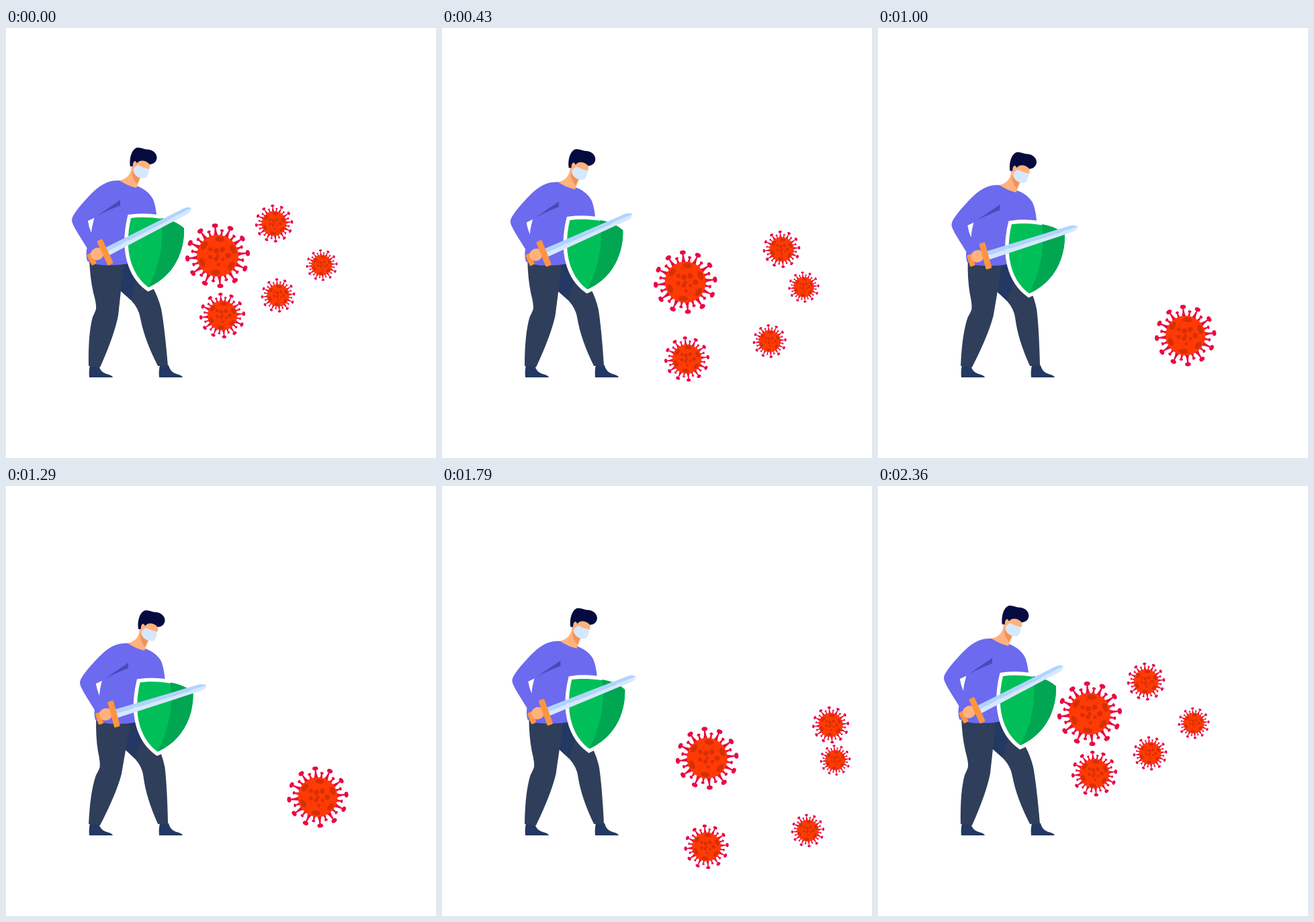
Write an HTML page that moves like this. It is 640x640 px and loops after 2430 ms.

```html
<!DOCTYPE html>
<html lang="en">
<head>
<meta charset="utf-8">
<title>Shield against viruses</title>
<style>
html, body { margin: 0; width: 100%; height: 100%; overflow: hidden; background: #fff; }
svg { display: block; width: 100%; height: 100%; }
</style>
</head>
<body>
<svg viewBox="0 0 640 640">
  <defs>
    <g id="virus"></g>
    <clipPath id="floor"><path d="M0 0H640V570H0Z"/></clipPath>
  </defs>

  <g fill="#233862">
    <path id="shoe" d="M125 502Q123 511 124 520H159Q158 517 150 515Q140 512 138 502Z"/>
    <use href="#shoe" x="104"/>
  </g>

  <g id="legs" fill="#2f3e5b">
    <path d="M182 345L171 391L186 405Q198 418 200 432Q206 464 226 503H241Q236 445 231 418Q227 402 219 387L205 345Z"/>
    <path fill="#233862" d="M170 345V391L186 405Q190 385 198 368L194 345Z"/>
    <path d="M124 344Q125 372 130 394Q135 412 134 418Q133 422 129 430Q122 456 123 503L140 505Q161 458 167 428L176 345Z"/>
  </g>

  <path id="body" fill="#6c6aef" d="M168 227L194 235C205 238 217 248 220 258Q224 270 225 290L200 345Q180 353 158 353Q132 354 121 347Q118 337 121 325L132 280L150 240Z"/>

  <g id="top">
    <path fill="#6c6aef" d="M176 228C150 223 135 238 120 254C106 269 98 280 98 286C98 293 112 313 121 328L127 304L122 288L150 272Z"/>
    <path fill="#fff" d="M122 287L131 283Q128 292 127 305Q123 296 122 287Z"/>
    <path fill="#434db8" d="M135 280L170 256V264Q150 272 135 280Z"/>
    <path fill="#ffb27d" d="M187 201Q188 223 169 227Q181 235 194 238L201 221L214 209V200L200 194Z"/>
    <path fill="#f0935a" d="M188 212Q190 219 199 223L195 232Q187 224 188 212Z"/>
    <path fill="#050b3f" d="M185 206C183 195 187 179 196 178C203 178 205 181 213 181C222 183 226 190 224 196Q222 202 214 203Q207 196 199 198L188 206Z"/>
    <path fill="#ffb27d" d="M189 208Q188 199 192 198Q195 199 195 204L192 209Z"/>
    <path fill="#d5e8ff" d="M196 204Q204 208 213 210Q212 220 208 223Q199 225 193 219Q189 214 190 209Z"/>
  </g>

  <g id="shield">
    <path fill="#00bf58" stroke="#fff" stroke-width="11" paint-order="stroke" d="M186 283C207 280 246 282 265 298C266 333 250 369 212 386C186 367 175 330 186 283Z"/>
    <path fill="#00a651" d="M231 283Q252 286 265 298C266 333 250 369 212 386Q238 335 231 283Z"/>
  </g>

  <g id="sword">
    <g transform="rotate(-27)">
      <path fill="#b0d4ff" d="M0 -6L135 -5Q142 -4 145 0H0Z"/>
      <path fill="#d5e8ff" d="M0 0H145Q141 5 135 5L0 7Z"/>
      <g fill="#ff9540">
        <rect x="-26" y="-9" width="8" height="18" rx="2"/>
        <ellipse fill="#ffb27d" cx="-11" cy="-3" rx="10" ry="9"/>
        <rect x="-4" y="-20" width="9" height="40" rx="2" transform="rotate(2)"/>
      </g>
    </g>
  </g>

  <g id="swarm" clip-path="url(#floor)"></g>
</svg>
<script>
const $ = id => document.getElementById(id);
const place = (el, transform) => el.setAttribute('transform', transform);

const oval = (angle, r, rx, ry) =>
  `<ellipse cx="${r}" rx="${rx}" ry="${ry}" transform="rotate(${angle})"/>`;
const spike = (angle, r, size) => oval(angle, r, size * .7, size) +
  `<path d="M28 ${-size}Q33 -1 ${r} -1V1Q33 1 28 ${size}Z" transform="rotate(${angle})"/>`;

// Long and short spikes alternate; spots form a rim and an inner spiral.
let spikes = '', spots = '';
for (let i = 0; i < 12; i++)
  spikes += spike(30 * i - 5, 45, 4.5) + spike(30 * i + 10, 38, 2.7);
for (let i = 0; i < 6; i++) spots += oval(60 * i - 23, 25, 4, 7);
for (let i = 0; i < 9; i++) {
  const size = 2.5 + i % 3 * .7;
  spots += oval(137.5 * i - 20, 5.4 * Math.sqrt(i), size, size);
}
$('virus').innerHTML = `<g fill="#e80a44">${spikes}</g>
  <circle r="31" fill="#ff3a05"/><g fill="#d82f04">${spots}</g>`;

const virus = (x, y, dx, dy, size) => {
  const el = document.createElementNS('http://www.w3.org/2000/svg', 'use');
  el.setAttribute('href', '#virus');
  $('swarm').append(el);
  return p => place(el,
    `translate(${x + dx * p} ${y + dy * p}) scale(${size * (1 - .05 * p)})`);
};
const swarm = [
  virus(315, 339, 149, 124, 1),
  virus(322, 428, 134, 204, .71),
  virus(399, 291, 336, 121, .59),
  virus(470, 353, 216, 103, .49),
  virus(405, 398, 261, 215, .53)
];

const LOOP = 2430, STEP = 71.5;
const ease = s => {
  s = Math.min(1, Math.max(0, s));
  return s * s * (3 - 2 * s);
};
// 0 = viruses close, 1 = viruses driven off
const retreat = t => t < 1200 ? ease(t / 1143) : ease((2325 - t) / 1028);

// Shift that is full at the hips or shoulders and fades to nothing at y = base.
const lean = (dx, dy, base) =>
  `matrix(1 0 ${-dx / base} ${1 - dy / base} ${dx} ${dy})`;

function draw(p) {
  place($('legs'), lean(32 * p, 6 * p, 504));
  place($('body'), `translate(${12 * p}) ${lean(0, 18 * p, 373)}`);
  place($('top'), `translate(${12 * p} ${7 * p})`);
  place($('shield'), `translate(${13.5 * p} ${9.5 * p})`);
  place($('sword'), `translate(${147 + 13 * p} ${334 + 5.5 * p}) rotate(${10 * p})`);
  swarm.forEach(move => move(p));
}

const start = performance.now();
function tick() {
  const t = (performance.now() - start) % LOOP;
  draw(retreat(Math.floor((t + 6.5) / STEP) * STEP)); // about 14 poses a second
  requestAnimationFrame(tick);
}
tick();
</script>
</body>
</html>
```
